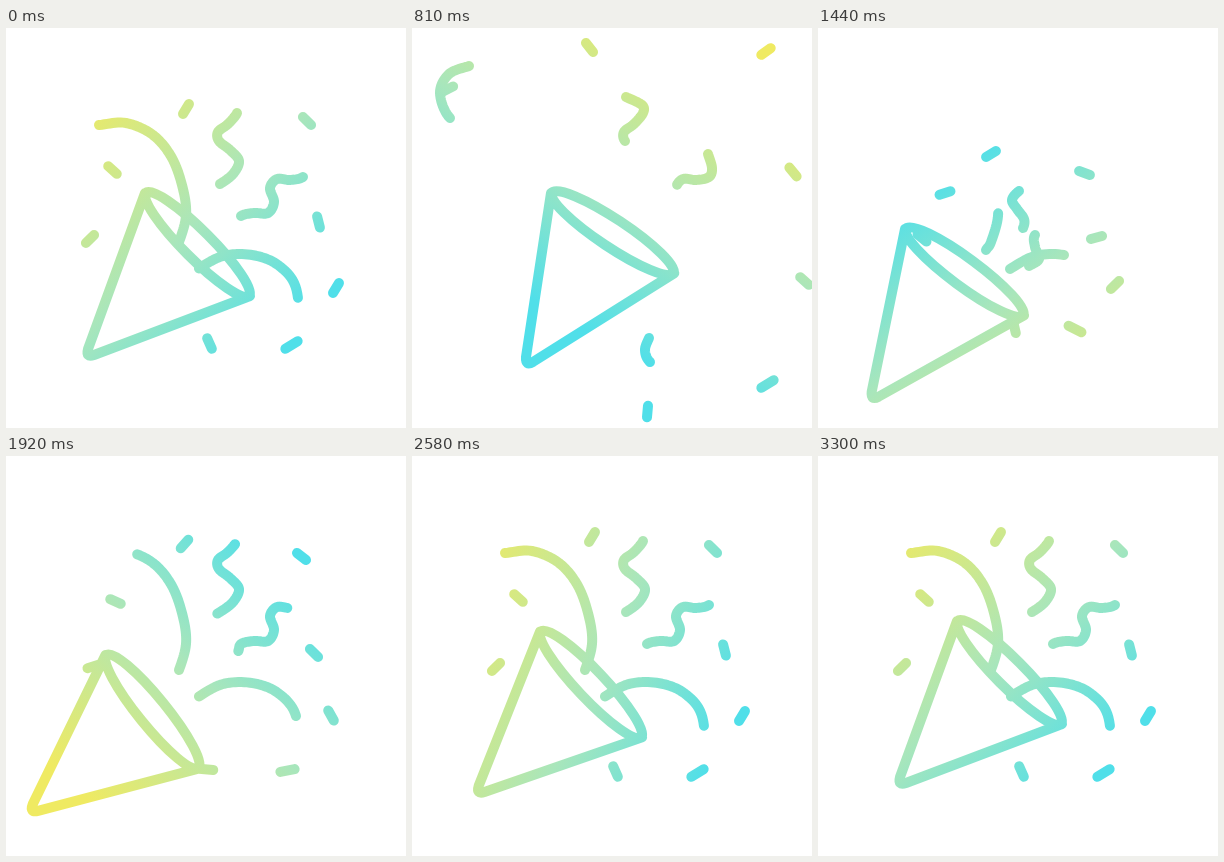
Animation, 400 px wide and 400 px high, one loop 5330 ms. Source, as an HTML page with a canvas:

```html
<!DOCTYPE html>
<html lang="en">
<head>
<meta charset="utf-8">
<title>Party popper</title>
<style>
html, body { margin: 0; width: 100%; height: 100%; overflow: hidden; background: #fff; }
canvas { display: block; }
</style>
</head>
<body>
<canvas id="stage" width="400" height="400"></canvas>
<script>
const ctx = document.getElementById('stage').getContext('2d');
const LOOP = 5330, STEP = 30, END = 3300, BURST = 1200, WIDTH = 10;
const OUT_TIMES = [0, 330, 810, BURST];
const IN_TIMES = [BURST, 1440, 1920, 2500];
const rad = deg => deg * Math.PI / 180;
const clamp01 = v => Math.max(0, Math.min(1, v));

// Smooth interpolation through key times without overshoot
function key(t, times, values) {
  const last = times.length - 1;
  if (t >= times[last]) return values[last];
  const i = Math.max(0, times.findIndex(k => k > t) - 1);
  const slope = k => (values[k + 1] - values[k]) / (times[k + 1] - times[k]);
  const tangent = k => {
    if (k === 0) return slope(0);
    if (k === last) return 0;
    const a = slope(k - 1), b = slope(k);
    return a * b <= 0 ? 0 : 2 * a * b / (a + b);
  };
  const d = times[i + 1] - times[i], u = (t - times[i]) / d;
  const h = u * u * (3 - 2 * u);
  return values[i] * (1 - h) + values[i + 1] * h
    + d * u * (1 - u) * ((1 - u) * tangent(i) - u * tangent(i + 1));
}

// v: rest, two poses flying away, two poses of the new burst
const fly = (t, v, gone, born) => t < BURST
  ? key(t, OUT_TIMES, [v[0], v[1], v[2], gone])
  : key(t, IN_TIMES, [born, v[3], v[4], v[0]]);

// Confetti: x, y, angle per pose; carry = how far it drifts on
const confetti = [
  { x: [180, 178.5, 177.5, 173, 178.5], y: [81, 45, 19.5, 126, 88], a: [121, 63, 52, 149, 131], carry: .1 },
  { x: [106.5, 63, 36, 127, 109.5], y: [142, 93, 61, 165, 145.5], a: [42, 63, 153, -18, 24], carry: .1 },
  { x: [84, 22.5, -25, 104, 87], y: [211, 272, 328, 210, 210.5], a: [135, 209, 240, 219, 163], carry: .3 },
  { x: [301, 327, 354, 266.5, 295.5], y: [93, 58.5, 23.5, 145, 100.5], a: [45, 110, 145, 20, 38], carry: .1 },
  { x: [312.5, 360, 381, 278.5, 308], y: [194, 160, 144, 209.5, 197], a: [76, 121, 231, -15, 45], carry: 1.4 },
  { x: [330, 374.5, 392.5, 297, 325], y: [260, 254.5, 253, 257, 259.5], a: [121, 148, 222, -45, 61], carry: 1.4 },
  { x: [285.5, 330.5, 355.5, 257, 281.5], y: [317, 342, 356, 301, 314.5], a: [148, 282, 328, 207, 169], carry: .1, len: 14.5 },
  { x: [203.5, 224, 235.5, 196.5, 201.5], y: [315.5, 359, 383.5, 299.5, 313.5], a: [66, -10, -85, -103, 4], carry: .1 }
];

// Streamers: a track, and the knot reached by head and tail in each pose
const streamers = [
  { track: [[162, 234], [168, 222], [173, 214], [180, 188], [177, 161], [166, 130], [147, 107], [120, 95],
      [93, 97], [63, 100], [38, 90], [28, 65], [37, 46], [57, 38]],
    head: [8, 9, 13, 3.1, 6.6], tail: [2, 4, 10, 1, 2] },
  { track: [[180, 250], [192, 241], [217, 228], [246, 227], [272, 237], [290, 260], [292, 304], [281, 334],
      [257, 346], [238, 334], [233, 322], [237, 310]],
    head: [5.25, 6, 11, 3, 5], tail: [1.05, 3.05, 9, 1, 1.05] },
  { track: [[198, 210], [205, 200], [206, 191], [199, 181], [194, 172], [201, 163], [214, 156], [227, 146],
      [233, 133], [224, 122], [213, 113], [212, 104], [222, 96], [231, 85], [230, 77], [214, 69]],
    head: [13, 13.3, 15, 5, 12.7], tail: [6, 6.3, 10, 1, 5.8] },
  { track: [[203, 243], [211, 238], [221, 231], [217, 219], [217, 207], [231, 197], [235, 188], [248, 185],
      [262, 185], [268, 174], [264, 160], [271, 151], [284, 152], [297, 149], [300, 140], [296, 126]],
    head: [13, 13.1, 15, 4, 11.8], tail: [6, 6.4, 10.3, 1, 5.2] }
];

// Catmull-Rom point at knot position s
function at(track, s) {
  const last = track.length - 1, i = Math.min(Math.floor(s), last - 1), u = s - i;
  const p = k => track[Math.max(0, Math.min(last, k))];
  return [0, 1].map(c => {
    const [a, b, d, e] = [p(i - 1)[c], p(i)[c], p(i + 1)[c], p(i + 2)[c]];
    return b + .5 * u * (d - a + u * (2 * a - 5 * b + 4 * d - e + u * (3 * (b - d) + e - a)));
  });
}

function drawStreamer({ track, head, tail }, t) {
  const end = track.length - 1;
  const a = fly(t, tail, end, 0), b = fly(t, head, end, 0);
  if (b - a < .02) return;
  const n = Math.ceil((b - a) * 10);
  ctx.beginPath();
  for (let i = 0; i <= n; i++) ctx.lineTo(...at(track, a + (b - a) * i / n));
  ctx.stroke();
}

function drawConfetti({ x, y, a, carry, len = 11.5 }, t) {
  const size = clamp01((t < BURST ? BURST - t : t - BURST) / 90);
  if (!size) return;
  const drift = v => v[2] + (v[2] - v[1]) * carry;
  const cx = fly(t, x, drift(x), 165), cy = fly(t, y, drift(y), 240);
  const angle = rad(fly(t, a, a[2], a[3]));
  const dx = Math.cos(angle) * len * size / 2, dy = Math.sin(angle) * len * size / 2;
  ctx.lineWidth = WIDTH * size;
  ctx.beginPath();
  ctx.moveTo(cx - dx, cy - dy);
  ctx.lineTo(cx + dx, cy + dy);
  ctx.stroke();
  ctx.lineWidth = WIDTH;
}

// The cone turns about the upper corner of its mouth and recoils at the burst
function drawPopper(t) {
  const turn = key(t, [0, 330, 810, 1110, 1200, 1440, 1650, 1860, 2190, 2580, END],
    [0, -2.6, -11.4, -14, -14, -8.5, 1.5, 6, 4.7, 1.6, 0]);
  const dx = key(t, [0, 1170, 1440, 1650, 1920, 2190, 2580, END], [0, 0, -52, -50, -39.5, -26, -11, 0]);
  const dy = key(t, [0, 1170, 1440, 1620, 1920, 2580, END], [0, 0, 36, 38.5, 34, 10.5, 0]);
  const m = new DOMMatrix().translate(139 + dx, 165 + dy).rotate(turn).translate(-139, -165);
  const shape = new Path2D('M139 165L82 321Q79.5 330 88 327L244 268');
  shape.moveTo(191.5 + 73 * Math.SQRT1_2, 216.5 + 73 * Math.SQRT1_2);
  shape.ellipse(191.5, 216.5, 73, 14, rad(45), 0, 2 * Math.PI);
  const placed = new Path2D();
  placed.addPath(shape, m);
  ctx.stroke(placed);
}

function gradient(t) {
  const angle = rad(key(t, [0, 330, 810, 1440, 1920, 2580, END], [45, 57, 120, 235, 315, 384, 405]));
  const c = Math.cos(angle), s = Math.sin(angle);
  const from = -200, to = 110;
  const g = ctx.createLinearGradient(225 + from * c, 205 + from * s, 225 + to * c, 205 + to * s);
  g.addColorStop(0, '#efea62');
  g.addColorStop(.54, '#a9e6bb');
  g.addColorStop(1, '#50dfe9');
  return g;
}

function draw(t) {
  ctx.fillStyle = '#fff';
  ctx.fillRect(0, 0, 400, 400);
  ctx.strokeStyle = gradient(t);
  ctx.lineWidth = WIDTH;
  ctx.lineCap = ctx.lineJoin = 'round';
  drawPopper(t);
  streamers.forEach(s => drawStreamer(s, t));
  confetti.forEach(c => drawConfetti(c, t));
}

const start = performance.now();
function tick() {
  const t = (performance.now() - start) % LOOP;
  draw(Math.min(END, Math.floor(t / STEP) * STEP));
  requestAnimationFrame(tick);
}
tick();
</script>
</body>
</html>
```
